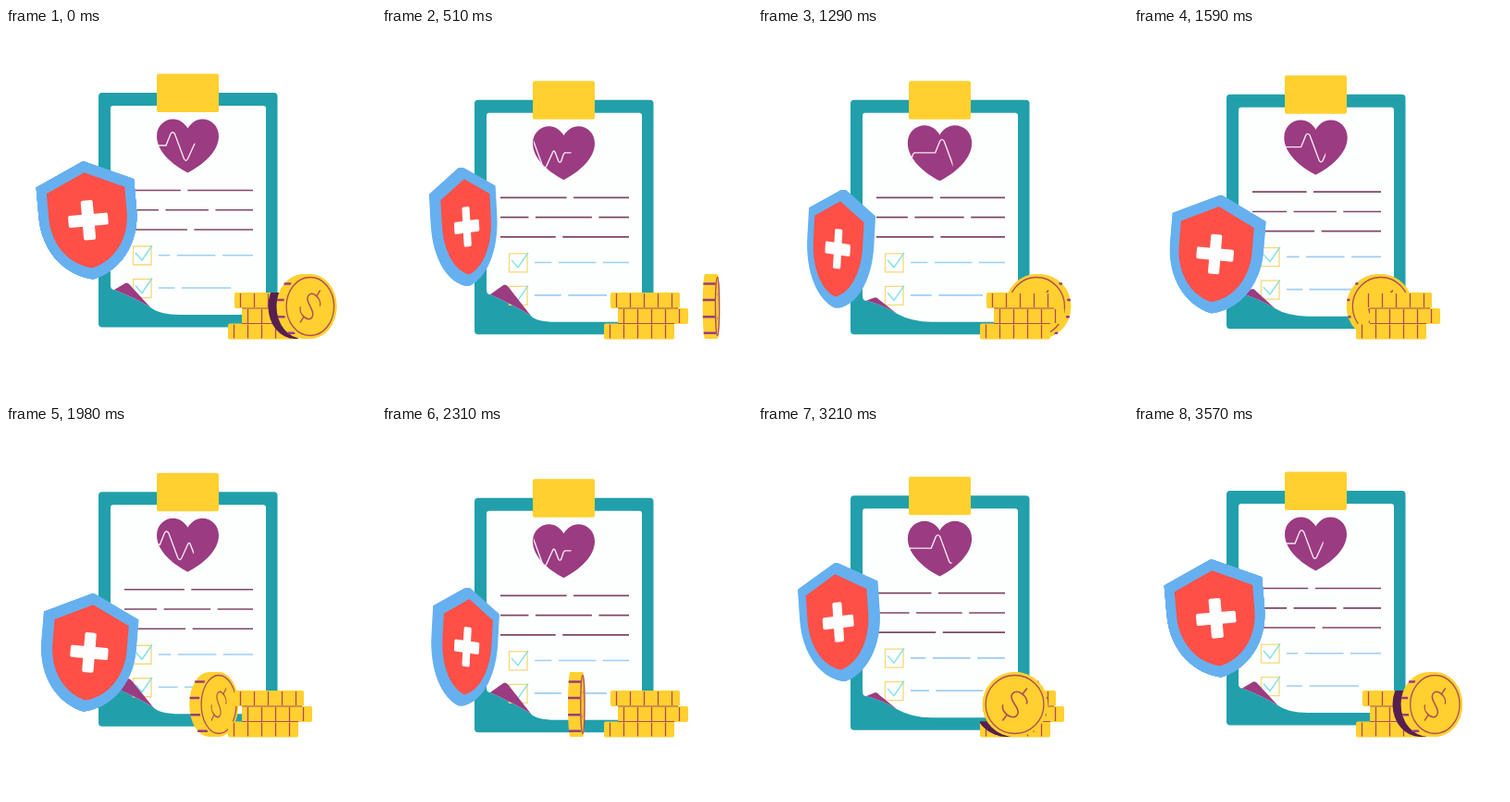
An HTML page with a canvas that plays this animation: 400x400 px, repeating every 3.6 s.

```html
<!DOCTYPE html>
<html lang="en">
<head>
<meta charset="utf-8">
<title>Health insurance</title>
<style>
  html, body { margin: 0; width: 100%; height: 100%; overflow: hidden; background: #fff; }
  canvas { display: block; }
</style>
</head>
<body>
<canvas id="stage" width="400" height="400"></canvas>
<script>
const ctx = document.getElementById('stage').getContext('2d');
const LOOP = 3600;
const TEAL = '#21a0ab', YELLOW = '#ffd02f', PURPLE = '#9b3b81', DARK = '#55204f',
      BLUE = '#66b0f0', RED = '#ff5048', PAPER = '#fdfffe', INK = '#7f4667', PALE = '#a0cdf6',
      ENGRAVE = '#ad4c5c';

const heart = new Path2D('M0-19C-3.5-25-9.5-29-15.5-29C-25.5-29-33.5-21.5-33.5-10.5C-33.5 6-16.5 20.5 0 29' +
  'C16.5 20.5 33.5 6 33.5-10.5C33.5-21.5 25.5-29 15.5-29C9.5-29 3.5-25 0-19Z');
const shield = new Path2D('M0-64L53-40V-8C53 32 28 58 0 64C-28 58-53 32-53-8V-40Z');
const pulse = new Path2D('M150 127H173L178 114.5Q180 111 182.5 114.5L192.5 141.5Q194.5 145 196.5 141.5' +
  'L203.5 126Q205 124 206 127L209.5 136Q211 138.5 212.5 136L215 128.5Q216 127 217 127H217');
const dollar = new Path2D('M10-8C8-16-9-16-9-7.5C-9 1 9-1 9 7.5C9 16-8 16-10 8M0-14V-22M0 14V22');
const stackRows = [[247, 286, 75], [255, 303, 76], [240, 319.5, 76]];

// Half-loop oscillation that peaks at the given time.
const wave = (t, peak) => Math.cos((t - peak) / 1800 * 2 * Math.PI);

function fill(path, color) {
  ctx.fillStyle = color;
  ctx.fill(path);
}

function stroke(path, color, width) {
  ctx.strokeStyle = color;
  ctx.lineWidth = width;
  ctx.stroke(path);
}

function box(x, y, w, h, r, color) {
  const path = new Path2D();
  path.roundRect(x, y, w, h, r);
  fill(path, color);
}

function isolated(draw) {
  ctx.save();
  draw();
  ctx.restore();
}

// A ruled line from x0 to x1, broken by 7.5 px wide gaps.
function ruled(x0, x1, y, gaps, color) {
  const path = new Path2D();
  path.moveTo(x0, y);
  for (const gap of gaps) {
    path.lineTo(gap, y);
    path.moveTo(gap + 7.5, y);
  }
  path.lineTo(x1, y);
  stroke(path, color, 1.6);
}

function drawHeart(t) {
  const scale = 1 + 0.035 * Math.max(0, -wave(t, 420));
  isolated(() => {
    ctx.translate(196.5, 127.5);
    ctx.scale(scale, scale);
    fill(heart, PURPLE);
  });
  isolated(() => {
    ctx.beginPath();
    ctx.rect(164, 95, 43 + 4 * wave(t, 1150), 65);
    ctx.clip();
    ctx.translate(-66 * (t % 1800) / 1800, 0);
    for (let i = 0; i < 3; i++) {
      stroke(pulse, '#f6e6f2', 1.4);
      ctx.translate(66, 0);
    }
  });
}

function drawClipboard(t) {
  const curl = 0.5 + 0.5 * wave(t, 420);
  const leftY = 287 - 7 * curl, tipX = 150 + 11 * curl, tipY = 301 + 2 * curl;
  const foldX = 128 + 6 * curl, foldY = 283 - 14 * curl;
  const edge = `Q${tipX - 16} ${tipY - 10} 117 ${leftY}`;

  box(100, 70, 193.5, 253.5, 4, TEAL);
  fill(new Path2D(`M116 84H278Q281 84 281 87V310H188Q166 310 ${tipX} ${tipY}${edge}` +
    `Q113 ${leftY} 113 ${leftY - 5}V87Q113 84 116 84Z`), PAPER);
  box(163, 49.5, 67, 41.5, 2, YELLOW);
  drawHeart(t);

  const mid = wave(t, 780), late = wave(t, 900);
  ruled(128, 267, 175.5, [193.5 + 7 * wave(t, 660)], INK);
  ruled(128, 267, 196.8, [161 - 4.3 * mid, 223.8 + 5.3 * mid], INK);
  ruled(128, 267, 218, [190 - 6 * wave(t, 850)], INK);
  ruled(165, 267, 245.7, [182.3 + 5 * late, 230.5 + 4 * late], PALE);
  ruled(165, 243, 281, [189.3 + 7.5 * mid], PALE);

  for (const y of [236, 271.5]) {
    stroke(new Path2D(`M137.5 ${y}h19.5v20h-19.5z`), '#f7d878', 1.3);
    stroke(new Path2D(`M140 ${y + 7}l7 8l11-16`), '#7fe0ec', 1.4);
  }
  fill(new Path2D(`M117 ${leftY}L${foldX - 3} ${foldY + 1}Q${foldX} ${foldY - 1} ${foldX + 3} ${foldY + 3}` +
    `L${tipX} ${tipY}${edge}Z`), PURPLE);
}

function drawShield(t) {
  const angle = t / LOOP * 2 * Math.PI;
  const turn = Math.cos(angle);
  const depth = 3.5 * Math.sin(angle) * Math.sign(turn);
  const y = 207.8 + 19 * (1 - turn);
  const face = (dx, draw) => isolated(() => {
    ctx.translate(88.9 + dx, y);
    ctx.scale(turn, 1);
    ctx.rotate(-0.087);
    draw();
  });
  for (let i = -4; i <= 4; i++) face(depth * i / 4, () => fill(shield, BLUE));
  face(depth, () => {
    isolated(() => {
      ctx.scale(0.8, 0.81);
      fill(shield, RED);
    });
    box(-21.5, -6.5, 43, 13, 2, '#fff');
    box(-6.5, -21.5, 13, 43, 2, '#fff');
  });
}

function drawStack() {
  for (const [x, y, w] of stackRows) {
    box(x, y, w, 17, 2, YELLOW);
    const marks = new Path2D();
    for (let i = 0; i < 5; i++) {
      marks.moveTo(x + 6.5 + 15 * i, y + 1);
      marks.lineTo(x + 6.5 + 15 * i, y + 16);
    }
    stroke(marks, ENGRAVE, 1.3);
  }
  stroke(new Path2D('M255 303H320M255 319.5H316'), ENGRAVE, 1);
}

function drawCoin(angle) {
  const radius = 35, cy = 301;
  const cx = 283 + 73 * Math.cos(angle);
  const squash = Math.abs(Math.sin(angle)), half = radius * squash;
  const shift = -6.75 * Math.cos(angle) * Math.sign(Math.sin(angle) || 1);
  const side = -Math.sign(shift);
  const front = cx + shift, back = cx - shift;

  const body = new Path2D();
  body.ellipse(front, cy, half, radius, 0, 0, 7);
  body.rect(Math.min(front, back), cy - radius, Math.abs(2 * shift), 2 * radius);
  const rear = new Path2D();
  rear.ellipse(back, cy, half, radius, 0, 0, 7);

  if (Math.sin(angle) < 0) isolated(() => {
    const area = new Path2D();
    for (const [x, y, w] of stackRows) area.rect(x, y, w, 17);
    ctx.clip(area);
    ctx.translate(-9, 0);
    fill(body, DARK);
    fill(rear, DARK);
  });

  fill(body, YELLOW);
  fill(rear, YELLOW);
  const dashes = new Path2D();
  for (const s of [-0.7, -0.2, 0.32, 0.82]) {
    const reach = side * half * Math.sqrt(1 - s * s);
    dashes.moveTo(back + reach, cy + radius * s);
    dashes.lineTo(front + reach, cy + radius * s);
  }
  stroke(dashes, PURPLE, 2.6);

  const face = new Path2D();
  face.ellipse(front, cy, half, radius, 0, 0, 7);
  fill(face, YELLOW);
  const ring = new Path2D();
  ring.ellipse(front, cy, half * 0.9, radius * 0.9, 0, 0, 7);
  stroke(ring, ENGRAVE, 1.3);
  isolated(() => {
    ctx.translate(front, cy);
    ctx.scale(squash, 1);
    ctx.rotate(0.65);
    stroke(dollar, ENGRAVE, 1.6);
  });
}

function render(now) {
  const t = now % LOOP;
  ctx.clearRect(0, 0, 400, 400);
  isolated(() => {
    ctx.translate(0, 6.5 * (1 - wave(t, 0)));
    drawClipboard(t);
  });
  drawShield(t);

  const orbit = t / LOOP * 2 * Math.PI - 55 * Math.PI / 180;
  const layers = [drawStack, () => drawCoin(orbit)];
  if (Math.sin(orbit) > 0) layers.reverse();
  layers.forEach(draw => draw());
}

const start = performance.now();
function tick() {
  render(performance.now() - start);
  requestAnimationFrame(tick);
}
tick();
</script>
</body>
</html>
```
